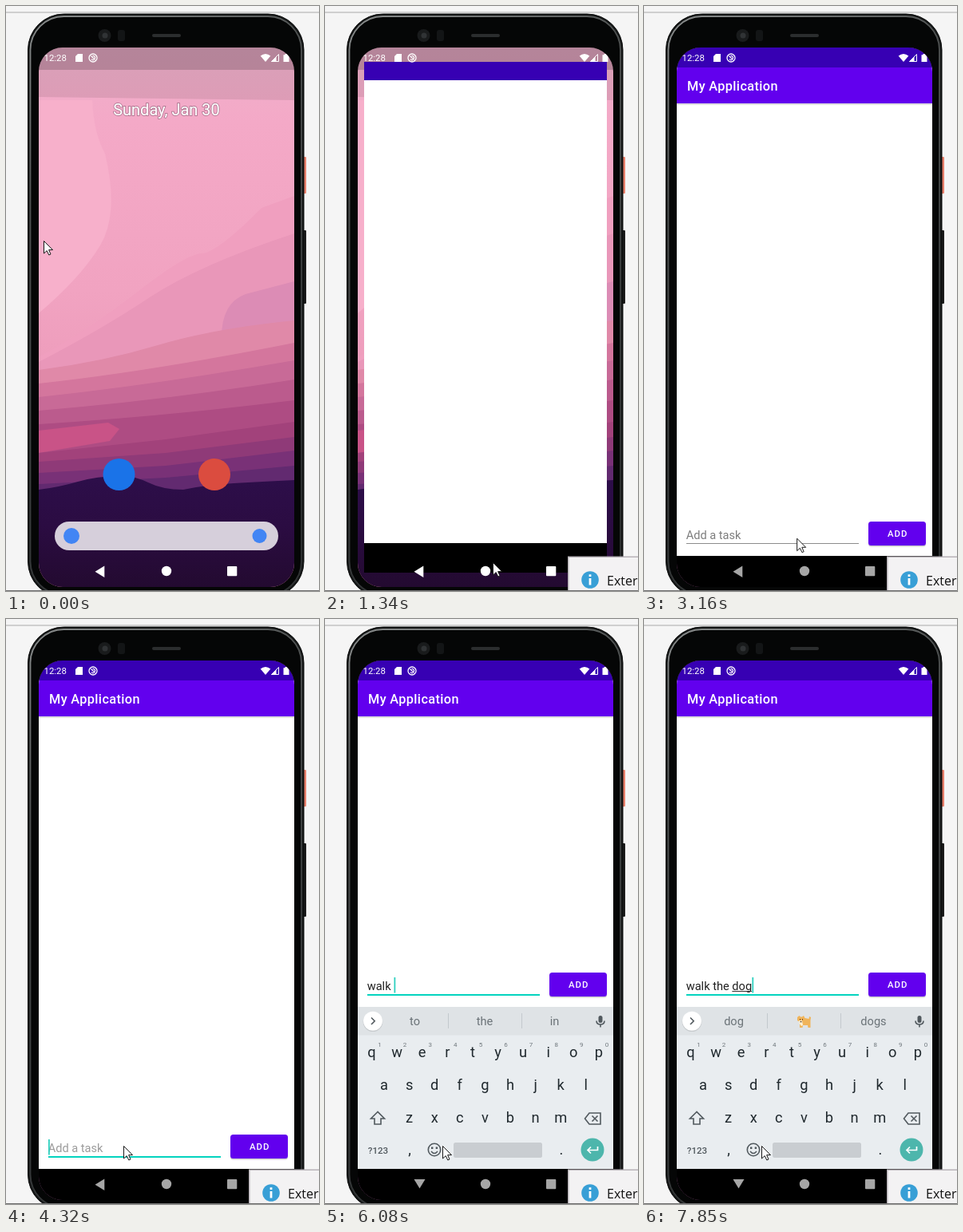
These frames come from a looping animation (392x733 px, 8000 ms). An HTML page:

```html
<!DOCTYPE html>
<html lang="en">
<head>
<meta charset="utf-8">
<title>Task app demo</title>
<style>
  html, body { margin: 0; width: 100%; height: 100%; overflow: hidden; background: #f5f5f5; }
  svg { display: block; width: 392px; height: 733px; }
  text { font-family: Roboto, sans-serif; white-space: pre; }
  .mid { text-anchor: middle; }
  .key { font-size: 18.3px; fill: #20292e; }
  .digit { font-size: 8px; fill: #6f777c; }
  .word { font-size: 14.6px; fill: #6b7378; }
  .icon { fill: none; stroke: #51595e; stroke-width: 1.6; }
</style>
</head>
<body>
<svg viewBox="0 0 392 733">
  <defs>
    <clipPath id="screen"><rect x="41" y="52" width="320" height="676" rx="30"/></clipPath>
    <clipPath id="page"><rect x="41" y="52" width="320" height="637"/></clipPath>
    <linearGradient id="sky" x2="0" y2="1">
      <stop offset="0" stop-color="#eeb0cb"/><stop offset=".14" stop-color="#f4a9c7"/>
      <stop offset=".45" stop-color="#f1a3c1"/><stop offset="1" stop-color="#e58cae"/>
    </linearGradient>
    <linearGradient id="ground" x2="0" y2="1">
      <stop offset="0" stop-color="#2d0e4a"/><stop offset=".45" stop-color="#2b0c42"/><stop offset="1" stop-color="#230a30"/>
    </linearGradient>
    <linearGradient id="edge" x2=".3" y2="1">
      <stop offset="0" stop-color="#8b8e8e"/><stop offset=".3" stop-color="#4f5252"/><stop offset="1" stop-color="#303334"/>
    </linearGradient>
  </defs>

  <path d="M0 8H392" stroke="#c3c3c3" stroke-width="1.5"/>
  <rect x="372" y="189" width="4" height="46" rx="1" fill="#e8806c"/>
  <rect x="372" y="281" width="4" height="92" rx="1" fill="#1c1c1c"/>
  <rect x="27.500" y="10" width="345.500" height="731" rx="45" fill="#151717" stroke="#0b0c0c"/>
  <rect x="30.500" y="13" width="339.500" height="725" rx="42" fill="#050606" stroke="url(#edge)" stroke-width="1.800"/>
  <circle cx="123.500" cy="37" r="8" fill="#191b1c"/><circle cx="124" cy="37" r="3.500" fill="#303335"/>
  <rect x="140" y="30" width="9" height="14" rx="3" fill="#131516"/>
  <rect x="183" y="35" width="36" height="4" rx="2" fill="#2b2d2e"/>

  <g clip-path="url(#screen)">
    <g id="home">
      <rect x="41" y="52" width="320" height="676" fill="url(#sky)"/>
      <g id="bands"></g>
      <path d="M41 606Q66 603 90 596T142 589Q160 588 178 597T222 606Q250 600 285 598T361 594V728H41Z" fill="url(#ground)"/>
      <g opacity=".085">
        <path d="M41 52H361V118L41 114Z"/>
        <path d="M41 52H361V96H41Z"/>
        <path d="M41 52H361V82H41Z"/>
        <path d="M41 52H361V72H41Z"/>
      </g>
      <path d="M41 52H361V80H41Z" opacity=".17"/>
      <g class="mid" font-size="20" fill="#fff">
        <text x="201" y="137" stroke="#80506a" stroke-opacity=".55" stroke-width="1.800">Sunday, Jan 30</text>
        <text x="201" y="137">Sunday, Jan 30</text>
      </g>
      <circle cx="141.500" cy="587" r="20" fill="#1a73e8"/>
      <circle cx="261" cy="587" r="20" fill="#db4c3f"/>
      <rect x="61" y="646" width="280" height="36" rx="18" fill="#d6cfdb"/>
      <circle cx="82" cy="664" r="10" fill="#4285f4"/>
      <circle cx="317.500" cy="664" r="9" fill="#4285f4"/>
    </g>

    <g id="launch">
      <path d="M49 70H353V710H49Z"/>
      <path d="M49 93H353V673H49Z" fill="#fff"/>
      <path d="M49 70H353V93H49Z" fill="#3700b3"/>
    </g>

    <g id="app">
      <path d="M41 52H361V728H41Z"/>
      <path d="M41 77H361V689H41Z" fill="#fff"/>
      <path d="M41 52H361V77H41Z" fill="#3700b3"/>
      <g id="content">
        <path d="M41 122H361V124H41Z" fill="#e0e0e0"/>
        <path d="M41 77H361V122H41Z" fill="#6200ee"/>
        <text x="54" y="106" font-size="16.300" font-weight="500" letter-spacing=".38" fill="#fff">My Application</text>
        <g id="row">
          <rect x="281" y="647.500" width="72" height="30" rx="3.500" fill="#cfcfcf"/>
          <rect x="281" y="646" width="72" height="30" rx="3.500" fill="#6200ee"/>
          <text x="305" y="665" font-size="11.400" font-weight="500" letter-spacing="1" fill="#fff">ADD</text>
          <text id="hint" x="52.700" y="667.500" font-size="14.600">Add a task</text>
          <text id="entry" x="52.700" y="667.500" font-size="14.600" fill="#212121"></text>
          <rect id="compose" y="669" height="1" fill="#333"/>
          <rect id="line" x="53" width="216"/>
          <rect id="caret" y="652" width="1.800" height="19.500" fill="#2fd0bf"/>
        </g>
      </g>
      <g clip-path="url(#page)"><g id="board">
        <path d="M41 486H361V689H41Z" fill="#e9edf0"/>
        <path d="M41 486H361V521.500H41Z" fill="#dfe3e6"/>
        <circle cx="60" cy="504.700" r="12.300" fill="#c6cacd"/><circle cx="60" cy="503.700" r="12" fill="#fff"/>
        <path class="icon" d="M58 499.500L62.200 503.700L58 508"/>
        <path d="M154.500 494V513M246.500 494V513" stroke="#c3c9cd"/>
        <g id="words"></g>
        <g id="dog">
          <path d="M192 499l2.500-2 1.500 1.500h2l2-1.500 1.500 3 5 1 .5-3 2 1-.5 4v9h-3l-.5-3h-6l-.5 3h-3.500v-7l-3-2Z" fill="#f0b45a"/>
          <path d="M194 503h4l1 6-2 1-3-4Z" fill="#fdf0d2"/>
          <path d="M195 501h1v1.500h-1Zm3 0h1v1.500h-1Zm-2.500 3h2v1.200h-2Z" fill="#60432c"/>
        </g>
        <rect x="342.500" y="497" width="5" height="9" rx="2.500" fill="#51595e"/>
        <path class="icon" d="M340 503.500Q340 508 345 508T350 503.500M345 508V511.500"/>
        <g id="keys"></g>
        <path class="icon" d="M66 617.500L57.500 626H62V633H70V626H74.500Z"/>
        <path class="icon" d="M325.500 626L331 619H345V633H331ZM334.500 622.500L341.500 629.500M341.500 622.500L334.500 629.500"/>
        <text class="mid" x="66.500" y="669.500" font-size="11.600" font-weight="500" fill="#51595e">?123</text>
        <text class="mid key" x="106" y="671">,</text>
        <text class="mid key" x="296" y="671">.</text>
        <circle class="icon" cx="137" cy="665" r="7.700"/>
        <path class="icon" d="M133 667Q137 672 141 667"/>
        <path d="M133 661.500h2.400v2.400h-2.400ZM138.700 661.500h2.400v2.400h-2.400Z" fill="#51595e"/>
        <rect x="161" y="656" width="111" height="19" rx="2.500" fill="#c9cdd1"/>
        <circle cx="335" cy="665" r="14.500" fill="#4db6ac"/>
        <path d="M341.500 661V665.500H329.500M333 661.500L329 665.500L333 669.500" fill="none" stroke="#fff" stroke-width="1.700"/>
      </g></g>
    </g>

    <g fill="#fff">
      <text x="47.500" y="69" font-size="11.400">12:28</text>
      <path d="M90 60H96V70H87V63Z"/>
      <circle cx="109" cy="65" r="5" fill="none" stroke="#fff" stroke-width="1.300"/>
      <path d="M106.500 62.500L111.500 67.500M107 66.500A2.500 2.500 0 0 0 110 67.500M108.500 62.500A2.500 2.500 0 0 1 111.300 66" fill="none" stroke="#fff" stroke-width="1.200"/>
      <path d="M318.700 62.500Q325 57.500 331.300 62.500L325 70Z"/>
      <path d="M341.500 60.500V69.500H332.500Z" fill="none" stroke="#fff"/><path d="M338.500 63.500V70H332Z"/>
      <path d="M347.500 61.200H349.500V60H352.500V61.200H354.500V70H347.500Z"/>
    </g>
    <g id="nav">
      <path id="back"/>
      <circle cx="201" cy="708" r="6.200"/>
      <rect x="277" y="702" width="12.300" height="12.300" rx="1"/>
    </g>
  </g>

  <g id="popup">
    <path d="M304 689.500H392V733H304Z" fill="#b7b2b7"/>
    <path d="M305.500 691H392V733H305.500Z" fill="#f3f2f3"/>
    <circle cx="332" cy="719" r="10.800" fill="#389fd6"/>
    <path d="M330.600 712.300h2.800v2.800h-2.800ZM330.600 717h2.800v8.500h-2.800Z" fill="#fff"/>
    <text x="353" y="726" font-size="16" fill="#111" style="font-family:'Open Sans','Noto Sans',sans-serif">Exter</text>
  </g>
  <path d="M0 732.500H392" stroke="#707070"/>
  <path id="mouse" d="M.5 .5V16L4.200 12.600L6.800 18L9 17L6.600 11.600H11.500Z" fill="#fff" stroke="#1a1a1a"/>
</svg>

<script>
const $ = id => document.getElementById(id);
const set = (id, attrs) => { for (const k in attrs) $(id).setAttribute(k, attrs[k]); };
const show = (id, on) => { $(id).style.display = on ? '' : 'none'; };
const label = (cls, x, y, s) => `<text class="mid ${cls}" x="${x}" y="${y}">${s}</text>`;
// Fraction done of a move in n jumps, 120 ms apart
const steps = (t, start, n) => Math.min(n, Math.max(0, Math.floor((t - start) / 120) + 1)) / n;

// Outline and colour; open outlines are filled down to the hills
const bands = [
  ['M41 118H108Q110 160 124 185Q142 260 118 300T41 385Z', '#f7b0cb'],
  ['M41 440Q105 405 165 358T245 310T320 253L361 238', '#f09fbf'],
  ['M41 446Q120 405 180 365T361 285', '#e997b9'],
  ['M270 415Q270 372 300 361L361 345V410Z', '#dc8cb5'],
  ['M41 456Q120 446 190 425T361 394', '#e089a8'],
  ['M41 473Q180 458 361 422', '#d4769d'],
  ['M41 490Q190 474 361 444', '#c86a97'],
  ['M41 507Q200 494 361 468', '#bb5b8d'],
  ['M41 524Q200 514 361 494', '#ae4c83'],
  ['M41 532L128 522L142 530L130 545L41 560Z', '#c95387'],
  ['M41 560L200 543L361 521', '#a2427b'],
  ['M41 571L200 560L361 540', '#8f3a78'],
  ['M41 585L200 576L361 557', '#793177'],
  ['M41 599L200 591L361 576', '#622a70'],
];
$('bands').innerHTML = bands.map(([d, c]) =>
  `<path d="${d.endsWith('Z') ? d : d + 'V612H41Z'}" fill="${c}"/>`).join('');

const rows = [['qwertyuiop', 58.5, 549], ['asdfghjkl', 74, 590], ['zxcvbnm', 105.6, 631]];
$('keys').innerHTML = rows.map(([chars, x0, y], r) => [...chars].map((c, i) => {
  const x = x0 + i * 31.6;
  return label('key', x, y, c) + (r ? '' : label('digit', x + 10, 536, (i + 1) % 10));
}).join('')).join('');

// time, text, start of the word being typed, suggestions
const typing = [
  [4840, '', 0, 'I the to'],
  [5080, 'w', 0, 'will we with'],
  [5200, 'wa', 0, 'want was way'],
  [5450, 'wal', 0, 'walk Wal wall'],
  [5700, 'walk', 0, 'walk walks walking'],
  [6080, 'walk ', 5, 'to the in'],
  [6610, 'walk t', 5, 'to the this'],
  [6730, 'walk th', 5, 'the this that'],
  [6850, 'walk the', 5, 'the they them'],
  [6970, 'walk the ', 9, 'dog same first'],
  [7350, 'walk the d', 9, 'day dog down'],
  [7470, 'walk the do', 9, 'do dog doing'],
  [7850, 'walk the dog', 9, 'dog * dogs'],
];
const pen = document.createElement('canvas').getContext('2d');
const widthOf = s => { pen.font = '14.6px Roboto, sans-serif'; return pen.measureText(s).width; };

function drawEntry(t) {
  const [, text, from, words] = typing.filter(e => e[0] <= t).pop() || [0, '', 0, ''];
  const end = widthOf(text), start = widthOf(text.slice(0, from));
  $('entry').textContent = text;
  set('compose', { x: 52.7 + start, width: end - start });
  set('caret', { x: 53 + end });
  $('words').innerHTML = words.split(' ').map((w, i) =>
    w == '*' ? '' : label('word', [112.5, 200, 287.5][i], 509, w)).join('');
  show('dog', words.includes('*'));
  show('hint', !text);
}

function draw(t) {
  const focus = t >= 4040, typingOn = t >= 4840;
  show('popup', t >= 690);
  show('launch', t >= 1340 && t < 1480);
  show('app', t >= 1480);
  set('content', { opacity: t < 2640 ? 0 : t < 2790 ? 0.6 : 1 });
  set('row', { transform: `translate(0 ${typingOn ? -203 : 0})` });
  set('hint', { fill: t < 4320 ? '#7d7d7d' : '#9b9b9b' });
  set('line', focus ? { y: 673, height: 2, fill: '#03d3bf' } : { y: 673, height: 1, fill: '#8c8c8c' });
  show('caret', focus);
  show('board', typingOn);
  set('board', { transform: `translate(0 ${t < 4960 ? 70 : 0})` });
  drawEntry(t);

  const grey = 255 - 89 * Math.min(1, Math.max(0, (t - 1820) / 660));
  set('nav', { fill: `rgb(${grey},${grey},${grey})` });
  set('back', { d: typingOn ? 'M111.5 702H125.500L118.500 713.500Z' : 'M111.500 708.700L123.300 701.500V716Z' });

  const a = steps(t, 120, 2), b = steps(t, 2240, 3), c = steps(t, 3160, 6);
  set('mouse', { transform: `translate(${47 + 163 * a - 10 * b - 53 * c} ${294 + 403 * a - 29 * b - 8 * c})` });
}

const begin = performance.now();
function tick() {
  draw((performance.now() - begin) % 8000);
  requestAnimationFrame(tick);
}
tick();
</script>
</body>
</html>
```
